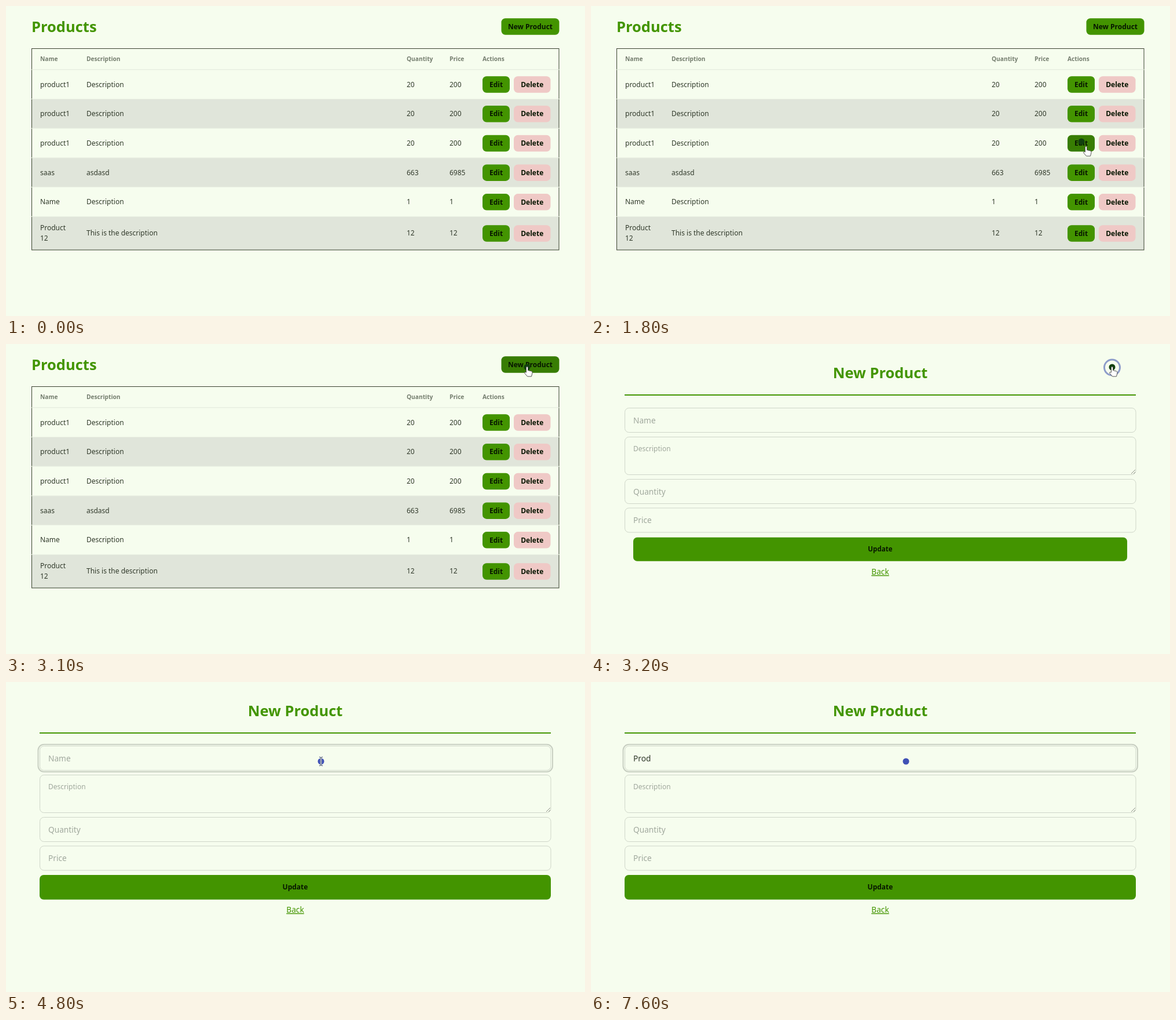
Write an HTML page that moves like this. It is 1000 px wide and 535 px high and loops after 8 s.

```html
<!DOCTYPE html>
<html lang="en">
<head>
<meta charset="utf-8">
<title>Products</title>
<style>
  html, body { margin: 0; width: 100%; height: 100%; overflow: hidden; background: #f6fdee; }
  svg { display: block; width: 1000px; height: 535px; }
  text { font: 12px "Noto Sans", "Open Sans", sans-serif; fill: #30392a; white-space: pre; }
  .title { font-size: 25.5px; font-weight: 700; fill: #439501; }
  .head { font-size: 10.2px; font-weight: 700; fill: #747d6e; }
  .label { font-weight: 700; fill: #071600; text-anchor: middle; }
  .field { font-size: 13.7px; }
  .hint { fill: #a0a89d; }
  .link { fill: #439501; text-anchor: middle; text-decoration: underline; }
  .box { fill: none; stroke: #cfd6c9; }
  .mid { text-anchor: middle; }
</style>
</head>
<body>
<svg viewBox="0 0 1000 535">
  <g id="list"></g>
  <g id="form"></g>
  <circle id="ring" fill="none" stroke="#8d9cca" stroke-width="3"/>
  <circle id="dot" r="5.5"/>
  <g id="pointer" stroke-linejoin="round">
    <path id="arrow" d="M0 0V14L3.2 11 5.5 16 7.8 15 5.6 10.2H10Z" fill="#fff" stroke="#555"/>
    <path id="hand" d="M-1.5 1Q-1.5-1 0-1T1.5 1V5.5L7.5 7Q9.5 7.5 9 10L7.5 16H.5L-4.5 10Q-4.5 7.5-1.5 9Z"
          fill="#fff" stroke="#555"/>
    <g id="beam" fill="none">
      <path d="M-3-7.5Q0-7.5 0-5.5V5.5Q0 7.5-3 7.5M3-7.5Q0-7.5 0-5.5M0 5.5Q0 7.5 3 7.5" stroke="#e4e9f0" stroke-width="2.6"/>
      <path d="M-3-7.5Q0-7.5 0-5.5V5.5Q0 7.5-3 7.5M3-7.5Q0-7.5 0-5.5M0 5.5Q0 7.5 3 7.5" stroke="#4a5360"/>
    </g>
  </g>
</svg>
<script>
const LOOP = 8000, STEP = 100, FORM_AT = 3200, FOCUS_AT = 4200;
const $ = id => document.getElementById(id);
const show = (el, on) => el.setAttribute('visibility', on ? 'inherit' : 'hidden');
const set = (el, attrs) => { for (const k in attrs) el.setAttribute(k, attrs[k]); };

const text = (x, y, str, cls = '') => `<text x="${x}" y="${y}" class="${cls}">${str}</text>`;
const rect = (x, y, w, h, extra) => `<rect x="${x}" y="${y}" width="${w}" height="${h}" ${extra}/>`;

// Product list
const GREEN = ['#439400', '#387d03'], PINK = ['#efc9c6', '#deb0ad'];
const buttons = [];
function button(x, y, w, label, fills) {
  buttons.push({ x, y, w, h: 28.5, fills });
  return rect(x, y, w, 28.5, `rx="7" fill="${fills[0]}" class="btn"`) +
    text(x + w / 2, y + 18.4, label, 'label');
}

const columns = [59, 139, 692, 766];
const rows = [
  ['product1', 'Description', 20, 200],
  ['product1', 'Description', 20, 200],
  ['product1', 'Description', 20, 200],
  ['saas', 'asdasd', 663, 6985],
  ['Name', 'Description', 1, 1],
  ['Product 12', 'This is the description', 12, 12]
];
const rowTop = i => 109.8 + i * 50.7;

function buildList() {
  let stripes = '', lines = '', cells = '';
  rows.forEach((row, i) => {
    const top = rowTop(i), last = i === rows.length - 1;
    const height = last ? 57.7 : 50.7, mid = top + (last ? 28.9 : 25.5);
    if (i % 2) stripes += rect(44, top, 911, height, 'fill="#e0e5da"');
    lines += rect(43, top - .5, 913, 1, `fill="${i ? '#ecf2e4' : '#e2e8db'}"`);
    row.forEach((value, c) => {
      const parts = last && c === 0 ? value.split(' ') : [value];
      parts.forEach((part, n) => {
        cells += text(columns[c], mid + 4.2 + (n - (parts.length - 1) / 2) * 18, part);
      });
    });
    cells += button(823, mid - 14, 47, 'Edit', GREEN) + button(877, mid - 14, 63.5, 'Delete', PINK);
  });
  const heads = ['Name', 'Description', 'Quantity', 'Price', 'Actions']
    .map((h, i) => text([...columns, 823][i], 95, h, 'head')).join('');
  $('list').innerHTML = text(44, 45, 'Products', 'title') +
    button(855.5, 21.3, 100, 'New Product', GREEN) + stripes +
    rect(44.5, 73.5, 910.5, 347.5, 'fill="none" stroke="#39412f"') + lines + heads + cells;
}

// Product form
function buildForm() {
  const box = (y, h) => rect(58.5, y, 882.5, h, 'rx="7" class="box"');
  $('form').innerHTML = text(499.5, 59, 'New Product', 'title mid') +
    rect(58, 87, 883, 2, 'fill="#439501"') +
    box(110.5, 42) + box(160.5, 65) + box(233.5, 42) + box(283, 42) +
    '<path d="M933 224L940 217M937 224L940 221" stroke="#8a9184"/>' +
    rect(55.5, 107.8, 888.5, 47.2, 'rx="10" fill="none" stroke="#c8cfc2" stroke-width="2" id="focus"') +
    text(73, 136.8, '', 'field').replace('<text', '<text id="name"') +
    text(73, 185, 'Description', 'hint') +
    text(73, 259.5, 'Quantity', 'field hint') + text(73, 309.2, 'Price', 'field hint') +
    rect(0, 123.5, 1, 16, 'fill="#111" id="caret"') +
    `<g id="update">${rect(58, 333, 883, 42.5, 'rx="7" fill="#439400"')}${text(499.5, 358.4, 'Update', 'label')}</g>` +
    text(499.5, 398, 'Back', 'field link');
}

// Pointer: time, x, y, shape
const path = [
  [300, 612, 525, 'arrow'], [500, 695, 468, 'arrow'], [700, 800, 300, 'arrow'], [900, 880, 110, 'arrow'],
  [1100, 905, 38, 'hand'], [1200, 890, 60, 'arrow'], [1300, 760, 130, 'arrow'], [1400, 620, 185, 'arrow'],
  [1500, 503, 236, 'arrow'], [1600, 700, 238, 'arrow'], [1700, 847, 234, 'hand'], [1800, 855, 243, 'hand'],
  [2000, 862, 262, 'hand'], [2100, 857, 242, 'hand'], [2300, 857, 242, 'hand'], [2500, 858, 325, 'hand'],
  [2600, 858, 339, 'hand'], [2700, 885, 204, 'hand'], [2800, 895, 90, 'arrow'], [2900, 900, 43, 'hand'],
  [3000, 900, 40, 'hand'], [3200, 900, 40, 'hand'], [3300, 880, 48, 'arrow'], [3500, 680, 100, 'beam'],
  [3700, 555, 135, 'beam'], [3800, 544, 137, 'beam']
];
function pointerAt(t) {
  let i = path.length - 1;
  while (i > 0 && path[i][0] > t) i--;
  const a = path[i], b = path[i + 1] || a;
  const k = b === a ? 0 : Math.max(0, (t - a[0]) / (b[0] - a[0]));
  return { x: a[1] + (b[1] - a[1]) * k, y: a[2] + (b[2] - a[2]) * k, shape: a[3] };
}

const typing = [
  [5900, 'P'], [6100, 'Pr'], [6200, 'Pro'], [6400, 'Prod'], [6600, 'Produ'], [6800, 'Produc'],
  [6900, 'Product'], [7300, 'Produc'], [7500, 'Produ'], [7600, 'Prod']
];
const clicks = [3100, FOCUS_AT];
const darkDot = [[1700, 2300], [3100, 3300], [4200, 4300]];
const caretOn = [[FOCUS_AT, 4800], [5400, 7600]];
const within = (spans, t) => spans.some(([from, to]) => t >= from && t < to);

// Button press rebound: .95 to 1.02 to 1 over a quarter second
function popScale(age) {
  if (age < 100) return .95 + .07 * Math.min(1, age / 100);
  return 1.02 - .02 * Math.min(1, (age - 100) / 150);
}

function drawPointer(t) {
  const p = pointerAt(t), trail = pointerAt(t - 100);
  show($('pointer'), t >= 300 && t < 6400);
  set($('pointer'), { transform: `translate(${p.x} ${p.y})` });
  for (const shape of ['arrow', 'hand', 'beam']) {
    $(shape).style.display = shape === p.shape ? '' : 'none';
  }
  show($('dot'), t >= 300);
  set($('dot'), { cx: trail.x, cy: trail.y, fill: within(darkDot, t) ? '#12400f' : '#3f51b5' });

  const click = clicks.find(c => t > c && t < c + 600);
  show($('ring'), click !== undefined);
  if (click !== undefined) {
    const age = t - click, at = pointerAt(click);
    set($('ring'), {
      cx: at.x, cy: at.y + .5,
      r: 13.5 + 9 * (1 - Math.exp(-(age - 100) / 150)),
      opacity: Math.min(1, 1.2 - age / 500)
    });
  }
  return p;
}

function draw(t) {
  const p = drawPointer(t), onForm = t >= FORM_AT;
  show($('list'), !onForm);
  show($('form'), onForm);
  btnEls.forEach((el, i) => {
    const b = buttons[i];
    const over = t >= 300 && p.x > b.x && p.x < b.x + b.w && p.y > b.y && p.y < b.y + b.h;
    el.setAttribute('fill', b.fills[+over]);
  });

  const s = popScale(t - FORM_AT + 23);
  set($('update'), { transform: `translate(499.5 354.25) scale(${s}) translate(-499.5 -354.25)` });
  show($('focus'), t >= FOCUS_AT);

  const typed = typing.filter(([at]) => at <= t).pop();
  const name = $('name');
  name.textContent = typed ? typed[1] : 'Name';
  name.setAttribute('class', typed ? 'field' : 'field hint');
  show($('caret'), within(caretOn, t) && onForm);
  set($('caret'), { x: 73 + (typed ? Math.floor(name.getComputedTextLength()) : 0) });
}

buildList();
buildForm();
// Paint order differs from creation order, so pair buttons by position.
const btnEls = buttons.map(b => [...document.querySelectorAll('.btn')]
  .find(el => +el.getAttribute('x') === b.x && +el.getAttribute('y') === b.y));

const start = performance.now();
function tick(now) {
  const t = Math.max(0, now - start) % LOOP;
  draw(Math.floor(t / STEP) * STEP);
  requestAnimationFrame(tick);
}
draw(0);
requestAnimationFrame(tick);
</script>
</body>
</html>
```
